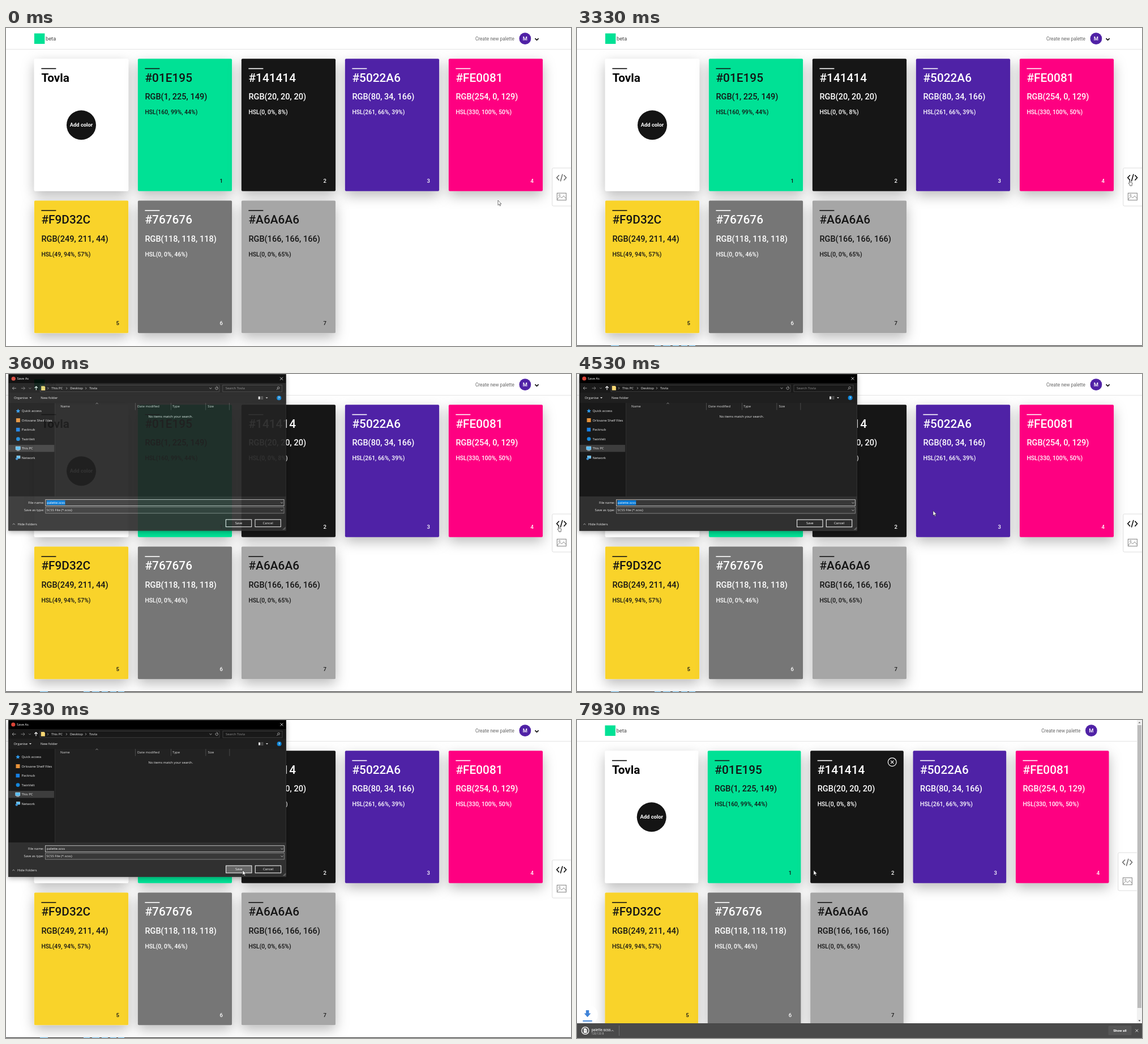
An HTML page that plays this animation: 998 by 561 pixels, repeating every 8 s.

```html
<!DOCTYPE html>
<html lang="en">
<head>
<meta charset="utf-8">
<title>Palette export</title>
<style>
html, body { margin: 0; width: 100%; height: 100%; overflow: hidden; background: #fff; }
svg { display: block; width: 100vw; height: 100vh; font-family: Roboto, sans-serif; cursor: default; user-select: none; }
#dialog { font-family: "Open Sans", "Noto Sans", sans-serif; }
</style>
</head>
<body>
<svg id="stage" viewBox="0 0 998 561" xmlns="http://www.w3.org/2000/svg"></svg>
<script>
const LOOP = 8000, STEP = 200 / 3;
const DARK = '#141414', WHITE = '#fff', PURPLE = '#5022A6';
const GAP = 16.8, CARD_H = 233.6;

const rect = (x, y, w, h, fill, extra = '') =>
  `<rect x="${x}" y="${y}" width="${w}" height="${h}" fill="${fill}" ${extra}/>`;
const circle = (x, y, r, fill, extra = '') =>
  `<circle cx="${x}" cy="${y}" r="${r}" fill="${fill}" ${extra}/>`;
const line = (d, color, width = 1, extra = '') =>
  `<path d="${d}" fill="none" stroke="${color}" stroke-width="${width}" ${extra}/>`;
const shape = (d, fill, extra = '') => `<path d="${d}" fill="${fill}" ${extra}/>`;
const text = (x, y, s, size, fill = WHITE, weight = 400, anchor = 'start', extra = '') =>
  `<text x="${x}" y="${y}" font-size="${size}" fill="${fill}" font-weight="${weight}" text-anchor="${anchor}" ${extra}>${s}</text>`;
const group = (id, body, extra = '') => `<g id="${id}" ${extra}>${body}</g>`;

const cards = [
  { bg: WHITE, ink: '#000' },
  { bg: '#01E195', ink: DARK, rgb: '1, 225, 149', hsl: '160, 99%, 44%' },
  { bg: '#141414', ink: WHITE, rgb: '20, 20, 20', hsl: '0, 0%, 8%' },
  { bg: '#5022A6', ink: WHITE, rgb: '80, 34, 166', hsl: '261, 66%, 39%' },
  { bg: '#FE0081', ink: WHITE, rgb: '254, 0, 129', hsl: '330, 100%, 50%' },
  { bg: '#F9D32C', ink: DARK, rgb: '249, 211, 44', hsl: '49, 94%, 57%' },
  { bg: '#767676', ink: WHITE, rgb: '118, 118, 118', hsl: '0, 0%, 46%' },
  { bg: '#A6A6A6', ink: DARK, rgb: '166, 166, 166', hsl: '0, 0%, 65%' }
];

function cardMarkup(c, i) {
  let s = rect(0, 0, 166, CARD_H, c.bg, 'class="face" rx="2" filter="url(#shadow)"') +
    rect(12.5, 16.6, 26, 1.6, c.ink);
  if (!i) {
    s += text(12.5, 40.4, 'Tovla', 20.8, c.ink, 700) +
      `<g class="mid">${circle(0, 117, 26, DARK)}${text(0, 120, 'Add color', 9.36, WHITE, 700, 'middle')}</g>`;
  } else {
    s += text(12.5, 40.4, c.bg, 20.8, c.ink, 500) +
      text(12.5, 72.3, `RGB(${c.rgb})`, 14.56, c.ink, 500) +
      text(12.5, 98.3, `HSL(${c.hsl})`, 10.4, c.ink, 500) +
      `<g class="right">${text(-19, 219, i, 9.6, c.ink, 500, 'middle')}
      <g class="close" opacity="0">${circle(-20, 20, 7.4, 'none', 'stroke="#fff" stroke-width="1.2"')}
      ${line('M-22.6 17.4l5.2 5.2m0-5.2l-5.2 5.2', WHITE, 1.2)}</g></g>`;
  }
  return `<g class="card">${s}</g>`;
}

function headerMarkup() {
  return rect(0, 0, 998, 37.5, WHITE) + rect(0, 37, 998, 1, '#e4e4e4') +
    group('brand', rect(0, 9.5, 18.5, 18.5, '#01E195') + text(20, 21.8, 'beta', 9.36, '#444')) +
    group('account',
      text(-119.2, 22, 'Create new palette', 8.32, '#666') +
      circle(-31.2, 18.7, 10.4, PURPLE) + text(-31.2, 22.1, 'M', 9.4, WHITE, 500, 'middle') +
      group('chevron', line('M-13.6 18.3l3.1 3 3.1-3', '#111', 1.8)));
}

function panelMarkup() {
  return rect(-33.2, -33.5, 36, 67, WHITE, 'rx="2" stroke="#ddd" stroke-width="1"') +
    group('code', line('M-21-21l-4.2 4.6 4.2 4.6M-12.6-21l4.2 4.6-4.2 4.6M-15-22.8l-3.6 12.8', 'currentColor', 1.5)) +
    rect(-24.6, 10.8, 16, 12.4, 'none', 'stroke="#808080"') +
    line('M-24 21.5l4.5-5 3 3 3.5-4 4.5 5', '#808080', .9) +
    circle(-20.3, 14.3, 1.3, 'none', 'stroke="#808080" stroke-width=".8"');
}

const label = (x, y, s, fill = '#f0f0f0', anchor = 'start') => text(x, y + 2.1, s, 5.9, fill, 400, anchor);
const chevron = (x, y, dx, dy, color = '#ccc') =>
  dx ? line(`M${x - 1} ${y - 1.8}l1.8 1.8-1.8 1.8`, color, .7)
     : line(`M${x - 2} ${y - dy}l2 ${2 * dy} 2 ${-2 * dy}`, color, .8);
const drop = (x, y) => shape(`M${x - 2} ${y - 1}h4l-2 2.2z`, '#ddd');

function dialogMarkup() {
  const edge = '#484848';
  const frame = rect(4, 0, 491, 276.5, '#202020', 'filter="url(#lift)"') +
    rect(4, 0, 491, 16, '#000') + rect(4, 16, 491, 17, '#191919') +
    rect(4, 33, 491, 18, '#1f1f1f') + rect(4, 51, 82, 165, '#191919') +
    rect(86, 51, .8, 165, '#333') + rect(4, 216, 491, 60.5, '#303030') +
    rect(4.3, .3, 490.4, 276, 'none', 'stroke="#3c3c3c" stroke-width=".6"');
  const title = circle(12.8, 8, 3.6, '#db4437') + label(19, 8, 'Save As', WHITE) +
    line('M484.5 5.5l5 5m0-5l-5 5', '#eee', .8);
  const nav = line('M17.5 25h-6.5m2.6-2.6l-2.6 2.6 2.6 2.6', '#aaa', .9) +
    line('M26.5 25h6.5m-2.6-2.6l2.6 2.6-2.6 2.6', '#888', .9) +
    chevron(42, 25, 0, .8, '#888') +
    line('M53 28.3v-6.5m-2.7 2.7l2.7-2.7 2.7 2.7', '#fff', 1.1) +
    rect(60, 19.3, 317, 11.8, 'none', `stroke="${edge}" stroke-width=".8"`) +
    shape('M61.8 21h5.5l1.6 1.4v6.4h-7.1z', '#f7d774') +
    chevron(74, 25, 1) + label(80, 25, 'This PC') + chevron(107, 25, 1) +
    label(113, 25, 'Desktop') + chevron(141, 25, 1) + label(147, 25, 'Tovla') +
    chevron(361.5, 25, 0, .9) +
    line('M373.8 23.3a2.3 2.3 0 1 1-2.6-.4M371.7 21.4l2.3 1.8-2.3 1', '#ccc', .7) +
    rect(383, 19.3, 105, 11.8, 'none', `stroke="${edge}" stroke-width=".8"`) +
    label(388, 25, 'Search Tovla', '#8c8c8c') +
    circle(481.6, 24.3, 1.8, 'none', 'stroke="#ccc" stroke-width=".7"') + line('M480.3 25.7l-2 2', '#ccc', .8);
  const tools = label(13.5, 42, 'Organise') + drop(43, 42) + label(61, 42, 'New folder') +
    rect(446, 39.5, 3.2, 5, '#ddd') + line('M450.5 40h4m-4 2h4m-4 2h4', '#999', .7) + drop(461, 42) +
    circle(482.6, 42, 4, '#0a84d8') + text(482.6, 44.2, '?', 6, WHITE, 700, 'middle');
  const list = chevron(160.5, 51.8, 0, -.8, '#aaa') +
    label(96, 57, 'Name', '#ddd') + label(232, 57, 'Date modified', '#ddd') +
    label(294, 57, 'Type', '#ddd') + label(356.5, 57, 'Size', '#ddd') +
    [228, 291, 352.5, 394.5].map(x => rect(x, 51, .8, 12.5, '#555')).join('') +
    label(251.5, 75, 'No items match your search.');
  const side = rect(4.6, 125, 80.4, 12.4, '#3d3d3d') +
    ['Quick access', 'Orlovane Shelf Files', 'Packnub', 'TwinVelt', 'This PC', 'Network']
      .map((s, i) => label(27.5, 65 + 16.55 * i, s)).join('') +
    shape('M21 61.2l1.1 2.5 2.8.3-2.1 1.8.6 2.8-2.4-1.5-2.4 1.5.6-2.8-2.1-1.8 2.8-.3z', '#2f9cf0') +
    rect(17.5, 78, 7, 7, '#e8923a') + rect(17.5, 94.8, 6.6, 6.6, '#1780e5') +
    circle(21, 114.6, 3.4, '#1587dc') +
    rect(16.8, 128, 8, 5.4, '#55bdf5', 'stroke="#c8e8fa" stroke-width=".6"') + rect(18.4, 134.4, 5, 1, '#c8d8e0') +
    rect(18.6, 144.3, 6, 4.6, '#55bdf5', 'stroke="#c8e8fa" stroke-width=".6"') + circle(18.8, 149.6, 2.2, '#3a8fd0');
  const field = (y, stroke) => rect(69.5, y, 422, 11, '#383838', `stroke="${stroke}" stroke-width=".9"`) +
    chevron(487.5, y + 5.6, 0, .9);
  const button = (x, s, id) => rect(x, 257, 45.4, 12.8, '#2e2e2e', `id="${id}" stroke="#eee" stroke-width="1.1"`) +
    label(x + 22.7, 263.3, s, WHITE, 'middle');
  const foot = label(67, 227, 'File name:', '#f0f0f0', 'end') + label(67, 240.3, 'Save as type:', '#f0f0f0', 'end') +
    field(221.7, '#c8c8c8') + field(234.9, '#8a8a8a') +
    rect(71.5, 222.9, 32.8, 8.4, '#0078d7', 'id="select"') + label(72, 226.8, 'palette.scss', WHITE) +
    rect(103.2, 223, .9, 8, WHITE, 'id="caret"') + label(71.3, 240.3, 'SCSS File (*.scss)') +
    button(388.6, 'Save', 'save') + button(440.3, 'Cancel', 'cancel') +
    chevron(13.3, 265, 0, -.9) + label(20, 265, 'Hide Folders') +
    line('M489.5 275l4.5-4.5m-2.5 4.5l2.5-2.5', '#aaa', .8);
  return frame + title + nav + tools + list + side + foot;
}

function shelfMarkup() {
  return rect(0, 0, 998, 26, '#4a4a4a') +
    circle(14.6, 13, 6.4, '#5a5a5a', 'stroke="#fff" stroke-width="1.2"') +
    shape('M12 9h3.4l2 2v6H12z', WHITE) + line('M13.2 12.4h3m-3 1.6h3', '#777', .6) +
    text(25.5, 13.6, 'palette.scss', 6.3, WHITE) + text(25.5, 20.3, '120/120 B', 4.7, '#bbb') +
    line('M60.6 14.2l2-2 2 2', '#ddd', .8) + rect(74, 4, .8, 18, '#777') +
    rect(938.5, 4.5, 41, 16.5, '#565656', 'rx="1.5"') +
    text(959, 15.2, 'Show all', 6.2, WHITE, 700, 'middle') +
    line('M986.4 10.6l4.8 4.8m0-4.8l-4.8 4.8', '#ddd', 1);
}

const scrollMarkup = rect(989, 0, 9, 536, '#f1f1f1') + rect(990, 9, 7, 499, '#bcbcbc') +
  shape('M991.5 5.6h4l-2-2.4z', '#666') + shape('M991.5 529.4h4l-2 2.4z', '#444');

const taskbarMarkup = rect(0, 559.9, 998, 1.1, '#3a3a3a') +
  [[60, 14], [137, 11], [152, 13], [169, 11], [184, 11], [198, 11]]
    .map(([x, w]) => rect(x, 559.9, w, 1.1, '#7cc4ee')).join('');

const arrivalMarkup = circle(0, 0, 18.2, WHITE, 'opacity=".95"') +
  shape('M-2.7-8h5.4v5.5h3.2L0 4.2l-5.9-6.7h3.2z', '#3f83d8') + rect(-8.2, 10, 16.4, 1.9, '#3f83d8');

const pointers = {
  arrow: shape('M0 0v8.6l2-1.8 1.4 3.1 1.3-.6-1.4-3h2.7z', WHITE, 'stroke="#222" stroke-width=".6"'),
  hand: shape('M1.6.6c.7-.5 1.3 0 1.3.6v2.7l3 .6c.7.2 1 .6.9 1.3l-.6 3v1.4H2.7V9L.4 6.3c-.3-.7.5-1 1.2-.4z', WHITE, 'stroke="#222" stroke-width=".7"'),
  beam: line('M-1.6-4h1.2l.4.5.4-.5h1.2M0-3.5v8M-1.6 5h1.2l.4-.5.4.5h1.2', '#ddd', .8)
};

const stage = document.getElementById('stage');
stage.innerHTML = `<defs>
  <filter id="shadow" x="-40%" y="-30%" width="180%" height="170%"><feDropShadow dx="0" dy="8" stdDeviation="11" flood-opacity=".27"/></filter>
  <filter id="lift" x="-10%" y="-10%" width="120%" height="125%"><feDropShadow dx="0" dy="3" stdDeviation="4" flood-opacity=".3"/></filter>
  </defs>` + rect(0, 0, 998, 561, WHITE) + headerMarkup() + cards.map(cardMarkup).join('') +
  group('panel', panelMarkup()) + group('scroll', scrollMarkup) + group('arrival', arrivalMarkup) +
  group('shelf', shelfMarkup()) + group('taskbar', taskbarMarkup) + group('dialog', dialogMarkup()) +
  Object.keys(pointers).map(k => group(k, pointers[k])).join('');

const $ = id => document.getElementById(id);
const all = s => [...stage.querySelectorAll(s)];
const cardNodes = all('.card'), closeNodes = all('.close');
const move = (node, x, y = 0) => node.setAttribute('transform', `translate(${x} ${y})`);
const show = (node, on) => node.setAttribute('opacity', +on);
const ramp = (t, a, b) => Math.min(1, Math.max(0, (t - a) / (b - a)));
const smooth = p => p * p * (3 - 2 * p);

const path = [
  [1400, 869, 304], [2200, 970, 269], [2330, 974, 268], [2500, 974, 268], [2530, 972, 268.5],
  [3110, 972, 268.5], [3130, 974, 268], [3870, 974, 268], [4670, 600, 239], [5200, 450, 229],
  [5600, 450, 229], [5870, 270, 262], [6130, 108, 229], [6400, 79, 239], [6670, 418, 265]
];

function pointerAt(t) {
  let a = path[0];
  for (const b of path) {
    if (t < b[0]) {
      const p = b === a ? 0 : smooth(ramp(t, a[0], b[0]));
      return [a[1] + (b[1] - a[1]) * p, a[2] + (b[2] - a[2]) * p];
    }
    a = b;
  }
  return [a[1], a[2]];
}

function layout(width, height) {
  const left = width * .05, w = (width * .9 - 4 * GAP) / 5;
  cardNodes.forEach((n, i) => {
    move(n, left + (i % 5) * (w + GAP), i < 5 ? 54.2 : 304.6);
    n.querySelector('.face').setAttribute('width', w);
    const mid = n.querySelector('.mid'), right = n.querySelector('.right');
    if (mid) move(mid, w / 2);
    if (right) move(right, w);
  });
  move($('brand'), left);
  move($('account'), width - left);
  move($('panel'), width, height / 2);
}

function draw(t) {
  const slide = smooth(ramp(t, 7600, 7860));
  const narrow = slide > .4;
  layout(narrow ? 989 : 998, 561 - 26 * slide);
  show($('chevron'), !narrow);
  show($('scroll'), narrow);
  move($('shelf'), 0, 561 - 26 * slide);
  show($('shelf'), slide > 0);
  const land = ramp(t, 7730, 7930);
  move($('arrival'), 18.5, 520 - 24 * (1 - land));
  show($('arrival'), land);
  show($('taskbar'), t > 3260 && t < 7600);

  const open = 1 - (1 - ramp(t, 3334, 3667)) ** 1.6;
  const shut = ramp(t, 7400, 7600);
  const scale = .92 + .08 * (1 - (1 - open) ** 1.5) - .06 * shut;
  const dialog = $('dialog');
  dialog.setAttribute('opacity', open * (1 - shut));
  dialog.setAttribute('transform', `translate(249.5 138) scale(${scale}) translate(-249.5 -138)`);
  show($('select'), t < 6120);
  show($('caret'), (t > 3860 && t < 4460) || (t > 6390 && t < 6925));
  $('save').setAttribute('fill', t > 7325 ? '#666' : '#2e2e2e');

  const [x, y] = pointerAt(t);
  const onIcon = t > 2120 && t < 3870;
  const inField = t > 3870 && x < 491 && y > 222 && y < 234;
  const kind = onIcon ? 'hand' : inField ? 'beam' : 'arrow';
  for (const k in pointers) {
    move($(k), x, y);
    show($(k), k === kind);
  }
  $('code').setAttribute('color', t > 2120 && t < 7600 ? '#000' : '#666');
  const hovered = t > 7590 ? 2 : t < 2200 && x < 948 && y < 288 ? 4 : 0;
  closeNodes.forEach((n, i) => show(n, i + 1 === hovered));
}

function frame(now) {
  const t = now % LOOP;
  draw(Math.floor((t + 4) / STEP) * STEP);
  requestAnimationFrame(frame);
}
draw(0);
requestAnimationFrame(frame);
</script>
</body>
</html>
```
